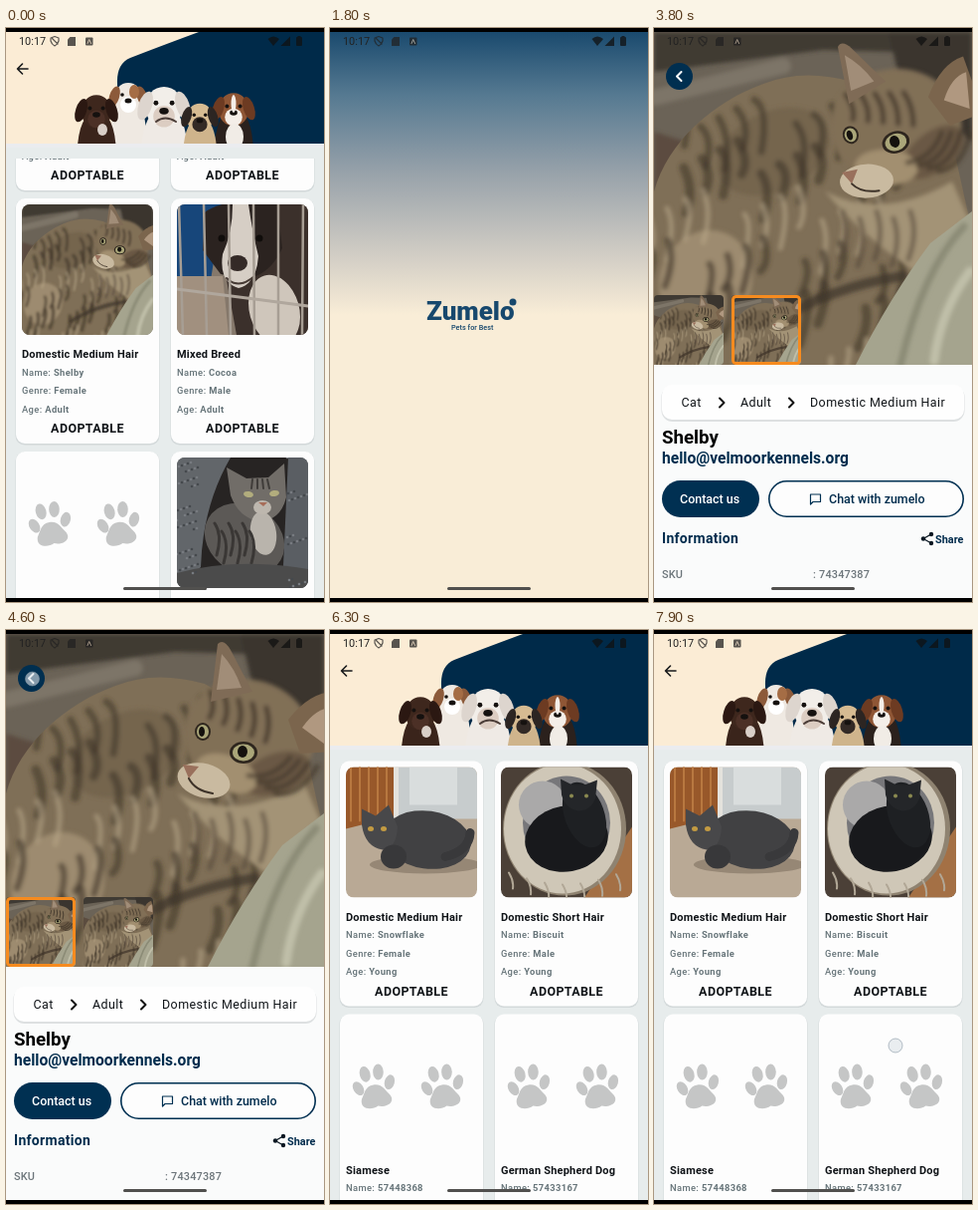
An HTML page that plays this animation: 320x576 px, repeating every 8 s.

```html
<!DOCTYPE html>
<html lang="en">
<head>
<meta charset="utf-8">
<title>Pet adoption app</title>
<style>
  html, body { margin: 0; width: 100%; height: 100%; overflow: hidden; background: #000; }
  svg { display: block; }
  #stage { width: 100%; height: 100%; }
  text { font-family: Roboto, sans-serif; fill: #101418; }
  .breed { font-size: 11px; font-weight: 700; letter-spacing: .2px; }
  .fact { font-size: 9.35px; font-weight: 500; letter-spacing: .38px; fill: #667479; }
  .fact tspan { font-weight: 700; }
  .action { font-size: 12.46px; font-weight: 700; letter-spacing: .4px; text-anchor: middle; }
  .crumb { font-size: 12.46px; letter-spacing: .45px; }
  .name { font-size: 18.7px; font-weight: 700; fill: #000; }
  .mail { font-size: 15.6px; font-weight: 600; fill: #002c4d; }
  .button { font-size: 12.46px; font-weight: 500; fill: #002c4d; }
  .heading { font-size: 14px; font-weight: 700; letter-spacing: .3px; fill: #002c4d; }
  .share { font-size: 10.9px; font-weight: 700; fill: #002c4d; }
  .sku { font-size: 10.9px; font-weight: 500; letter-spacing: .2px; fill: #6c757a; }
  .clock { font-size: 10.9px; fill: #222; }
  .logo { font-size: 26px; font-weight: 900; fill: #17486d; }
  .slogan { font-size: 7.3px; font-weight: 500; fill: #17486d; }
</style>
</head>
<body>
<svg id="stage" viewBox="0 0 320 576"></svg>
<script>
const NAVY = '#003052';
const LOOP = 8000;

const ellipse = (x, y, rx, ry, fill, turn = 0) =>
  `<ellipse cx="${x}" cy="${y}" rx="${rx}" ry="${ry}" fill="${fill}" transform="rotate(${turn} ${x} ${y})"/>`;
const dot = (x, y, r, fill) => ellipse(x, y, r, r, fill);
const rect = (x, y, w, h, fill, r = 0, extra = '') =>
  `<rect x="${x}" y="${y}" width="${w}" height="${h}" rx="${r}" fill="${fill}" ${extra}/>`;
const shape = (d, fill) => `<path d="${d}" fill="${fill}"/>`;
const line = (d, color, width, extra = '') =>
  `<path d="${d}" fill="none" stroke="${color}" stroke-width="${width}" stroke-linecap="round" stroke-linejoin="round" ${extra}/>`;
const text = (kind, x, y, content) => `<text class="${kind}" x="${x}" y="${y}">${content}</text>`;
const group = (id, content) => `<g id="${id}">${content}</g>`;
const soft = content => `<g filter="url(#soft)">${content}</g>`;
const repeat = (count, draw) => Array.from({ length: count }, (_, i) => draw(i)).join('');

// Photos, simplified to soft shapes
const TABBY_BODY = 'M0 160C14 110 60 70 110 52Q150 36 200 50L300 110 320 200 205 334H0Z';
const tabbyPhoto = headMove => {
  const stripes = repeat(70, i => {
    const x = (i * 61) % 270 - 14, y = 48 + (i * 47) % 285;
    return line(`M${x} ${y}q${18 - y / 20} ${8 + i % 5 * 4} ${12 - y / 14} ${34 + i % 4 * 6}`, i % 3 ? '#40362a' : '#b9a88b', 5 + i % 3 * 2, 'opacity=".6"');
  });
  const head = soft(ellipse(244, 104, 66, 58, '#816f56', 18)
    + ellipse(272, 140, 36, 20, '#6a5944', -20) + ellipse(222, 140, 32, 18, '#a28f70', 20)
    + repeat(5, i => line(`M${206 + i * 14} ${58 + i * 4}q5 16 -1 ${26 + i * 2}`, '#40362b', 5, 'opacity=".8"'))
    + repeat(4, i => line(`M${244 + i * 9} ${142 + i * 6}q24 4 42 ${-18 - i * 3}`, '#43382b', 5, 'opacity=".7"')))
    + shape('M206 68L213 10Q219 4 226 16L248 58Z', '#7f6b56') + shape('M212 56L217 20Q230 34 237 54Z', '#a18d78')
    + shape('M284 86Q306 58 330 58L332 118 296 120Z', '#7b654d') + shape('M298 94Q312 74 328 74L320 110Z', '#b09880')
    + ellipse(199, 147, 27, 17, '#c9baa0', 15)
    + ellipse(198, 98, 8, 9, '#2e261e') + ellipse(198, 98, 6, 7, '#aaa679') + ellipse(197, 98, 3, 5, '#15120e')
    + ellipse(239, 119, 14, 11, '#2e261e') + ellipse(239, 119, 11, 8.5, '#aaa679') + ellipse(238, 118, 5, 6, '#15120e')
    + shape('M178 131L194 133 184 145Z', '#99705c') + line('M184 145Q190 157 208 160', '#3d3228', 2);
  return rect(0, 0, 320, 334, '#6b6357') + soft(
      shape('M0 0H320V22L170 18 0 40Z', '#3f3a33') + line('M0 66L130 34', '#7d7568', 16)
      + shape('M236 0H320V110L250 60Z', '#3a352f') + shape('M0 100L38 112 0 185Z', '#5b4c3f'))
    + `<g clip-path="url(#tabbyBody)">${rect(0, 0, 320, 334, '#7f6f57')}`
    + soft(ellipse(52, 250, 46, 52, '#9d8b6f', 25) + ellipse(120, 120, 60, 40, '#75654e', -25) + stripes) + '</g>'
    + soft(shape('M172 160Q230 190 300 150L320 195 262 240Q210 205 172 160Z', '#a39376')
      + repeat(5, i => line(`M${190 + i * 17} ${180 + i % 2 * 7}q8 22 -2 48`, '#54463a', 5, 'opacity=".6"'))
      + line('M120 292Q180 255 250 245', '#3d3228', 10, 'opacity=".7"'))
    + `<g transform="${headMove}">${head}</g>`
    + shape('M320 180L278 212Q238 265 203 334H320Z', '#a5a48e')
    + soft(line('M312 195Q270 240 248 334', '#8b8b76', 7) + line('M318 240Q288 280 282 330', '#c0bfa9', 9));
};

const kennelPhoto = rect(0, 0, 132, 131, '#85786b') + shape('M0 0H46L34 76 0 72Z', '#17467a')
  + shape('M0 72H46L52 131H0Z', '#a1907f') + shape('M84 0H132V131H60L50 76Z', '#3b302b')
  + ellipse(98, 106, 25, 36, '#cfc6bb', -16) + shape('M28 8Q46 -6 100 -4L106 44Q92 74 66 74L44 70 26 46Z', '#2b2320')
  + shape('M56 0H72Q76 28 82 52 80 80 62 84 42 78 46 50 56 28 56 0Z', '#d6cec5')
  + ellipse(61, 59, 10, 8, '#342a27') + dot(45, 34, 3.5, '#100d0b') + dot(83, 34, 3.5, '#100d0b')
  + line('M50 74Q62 86 78 72', '#463a34', 2)
  + repeat(6, i => line(`M${2 + i * 25} 0L${6 + i * 24} 131`, '#a79e94', 2.5)) + line('M0 85L132 102', '#b0a79d', 3);

const boxCatPhoto = rect(0, 0, 132, 131, '#55585b') + shape('M30 0H116L108 114 22 118Z', '#272423')
  + shape('M0 0H54Q26 48 24 110L0 131Z', '#62666a') + ellipse(68, 82, 42, 34, '#5c5956', 30)
  + shape('M54 38L50 10 70 21 92 20 108 6 110 40Q104 64 82 64 62 60 54 38Z', '#716d68')
  + ellipse(87, 76, 13, 22, '#b9b4ac', -8) + ellipse(72, 37, 5, 3, '#b2ad7d', 10) + ellipse(98, 36, 5, 3, '#b2ad7d', -10)
  + ellipse(86, 50, 9, 7, '#bdb7ae') + shape('M82 45H91L87 49Z', '#a76d59')
  + repeat(4, i => line(`M${76 + i * 5} 22l${i - 1} 9`, '#3f3c39', 2))
  + repeat(6, i => line(`M${38 + i * 7} ${66 + i % 2 * 8}q8 12 2 32`, '#3a3735', 3))
  + shape('M112 0H132V131H106Z', '#5a5e63') + shape('M0 116Q60 100 132 112V131H0Z', '#4b4b4b')
  + repeat(90, i => dot(i * 37 % 22 + (i % 3 ? 0 : 111), i * 29 % 131, 1.3, i % 2 ? '#45494d' : '#777b80'));

const carpetCatPhoto = rect(0, 0, 132, 131, '#b9a995') + rect(50, 0, 82, 52, '#c7cccd')
  + rect(64, 0, 48, 38, '#d9dddd') + shape('M0 0H48V50L0 62Z', '#98582a')
  + repeat(5, i => line(`M${5 + i * 9} 0V54`, '#b87840', 2)) + rect(48, 0, 5, 52, '#e4e2dc')
  + ellipse(80, 98, 56, 9, '#968775') + ellipse(82, 73, 44, 29, '#414143', 8)
  + shape('M16 58L16 42 30 49 43 38 52 60Q51 82 37 83 19 80 16 58Z', '#48484a') + ellipse(48, 90, 13, 12, '#38383a')
  + line('M100 90Q124 84 125 66', '#39393b', 9) + ellipse(25, 62, 3, 2.5, '#c39b42') + ellipse(38, 62, 3, 2.5, '#c39b42');

const bedCatPhoto = rect(0, 0, 132, 131, '#4b4037') + shape('M84 131L132 60V131Z', '#a47045')
  + ellipse(64, 62, 62, 67, '#8f8371') + ellipse(62, 62, 59, 65, '#cfc7b7') + ellipse(66, 56, 44, 47, '#77777a')
  + ellipse(42, 38, 24, 24, '#aaa9a9') + ellipse(66, 72, 42, 33, '#18191c', -10) + ellipse(84, 48, 20, 34, '#1e2023', -20)
  + shape('M61 28L60 12 72 18 84 18 97 13 95 32Q90 44 78 44 65 42 61 28Z', '#242629')
  + dot(71, 29, 2, '#8a8950') + dot(86, 29, 2, '#8a8950')
  + repeat(7, i => line(`M${8 + i * 18} ${106 + 12 * Math.sin(i / 2)}q5 8 4 16`, '#b1a796', 2));

const symbol = (id, w, h, content) =>
  `<symbol id="${id}" viewBox="0 0 ${w} ${h}" preserveAspectRatio="xMidYMid slice">${content}</symbol>`;
const clip = (id, content) => `<clipPath id="${id}">${content}</clipPath>`;
const photo = (id, x, y, w, h) =>
  `<g transform="translate(${x} ${y})" clip-path="url(#round${w})"><use href="#${id}" width="${w}" height="${h}"/></g>`;

const paw = (x, y) => `<g transform="translate(${x} ${y}) rotate(-10)" fill="#c5c6c6">`
  + ellipse(-15.5, -1, 5, 7.5, '#c5c6c6', -22) + ellipse(-6.5, -14, 5.3, 8, '#c5c6c6', -5)
  + ellipse(7, -14, 5.3, 8, '#c5c6c6', 8) + ellipse(16.5, -2, 5, 7.5, '#c5c6c6', 25)
  + shape('M0 -2C9 -2 11 6 15 11 19 19 9 23 1 19.500-6 23-18 20-14 10-10 5-9-2 0-2Z', '#c5c6c6') + '</g>';

const pets = {
  unseen: ['Mixed Breed', 'Juniper', 'Male', 'Adult'],
  tabby: ['Domestic Medium Hair', 'Shelby', 'Female', 'Adult', 'tabby'],
  kennel: ['Mixed Breed', 'Cocoa', 'Male', 'Adult', 'kennel'],
  boxCat: ['Domestic Short Hair', 'Pepper', 'Male', 'Adult', 'boxCat'],
  carpetCat: ['Domestic Medium Hair', 'Snowflake', 'Female', 'Young', 'carpetCat'],
  bedCat: ['Domestic Short Hair', 'Biscuit', 'Male', 'Young', 'bedCat'],
  siamese: ['Siamese', '57448368', 'Male', 'Baby'],
  shepherd: ['German Shepherd Dog', '57433167', 'Female', 'Adult'],
};
const card = (key, x, y) => {
  const [breed, name, genre, age, picture] = pets[key];
  const fact = (label, value, top) => text('fact', 6, top, `${label}: <tspan>${value}</tspan>`);
  return `<g transform="translate(${x} ${y})">` + rect(-.5, .5, 145, 247, '#d3d9da', 9) + rect(0, 0, 144, 246, '#fdfdfd', 9)
    + paw(34, 73) + paw(103, 73)
    + (picture ? `<g class="picture">${rect(6, 6, 132, 131, '#fdfdfd')}${photo(picture, 6, 6, 132, 131)}</g>` : '')
    + text('breed', 6, 160, breed) + fact('Name', name, 177.7) + fact('Genre', genre, 196.3) + fact('Age', age, 214.9)
    + text('action', 72, 235, 'ADOPTABLE') + rect(0, 0, 144, 246, '#12303f', 9, `id="press-${key}" opacity="0"`) + '</g>';
};
const rows = (top, keys) => keys.map((key, i) => card(key, i % 2 ? 166 : 10, top + 254 * Math.floor(i / 2))).join('');

const dog = (x, y, size, coat, head, ear, muzzle) => `<g transform="translate(${x} ${y}) scale(${size})">`
  + shape('M-18 46Q-18 14 -10 4H11Q19 16 18 46Z', coat) + ellipse(0, -2, 14, 15, head)
  + ellipse(-14, -3, 5, 11, ear, 18) + ellipse(14, -3, 5, 11, ear, -18)
  + ellipse(0, 5, 8, 8, muzzle) + ellipse(0, 1, 3.5, 2.5, '#15110f') + dot(-6, -5, 1.8, '#15110f') + dot(6, -5, 1.8, '#15110f') + '</g>';
const header = rect(0, 4, 320, 568, '#e7ecec') + rect(0, 4, 320, 112, '#fbecd5')
  + shape('M194 4Q156 18 125 30 111 36 112 56V116H320V4Z', '#002a49') + rect(0, 116, 320, 4, '#ebecef')
  + `<g clip-path="url(#headerArea)">`
  + dog(123, 72, 1, '#efe9e2', '#efe9e2', '#8c5a3a', '#fff') + ellipse(129, 64, 5, 7, '#a56d45')
  + dog(91, 86, 1.1, '#3a241b', '#3e271d', '#2b1812', '#4c3026') + ellipse(97, 102, 5, 6, '#d9cfc8')
  + dog(229, 84, 1.1, '#2b211d', '#8f5635', '#6d3b22', '#f4eee8') + ellipse(229, 76, 2.5, 9, '#f4eee8') + ellipse(230, 109, 9, 13, '#f1ece6')
  + dog(159, 82, 1.35, '#efeae5', '#f2eee9', '#ddd5ce', '#dccdc2') + line('M151 94Q160 87 171 94', '#4b3d38', 2)
  + dog(195, 92, .95, '#cfb48c', '#d6bb92', '#2c2522', '#332a26') + '</g>'
  + line('M22 41H11.5M16.5 36L11.5 41 16.5 46', '#17191b', 1.6);

const statusBar = text('clock', 13, 17, '10:17') + `<g opacity=".75">`
  + line('M45 10L49 8.5 53 10V13Q52 16.500 49 18 46 16.500 45 13ZM46.500 10.500L52 16', '#222', 1.2)
  + shape('M64.500 9H70V18H62V11.500Z', '#222') + rect(80, 9.5, 7.5, 8, '#222', 1) + line('M82 15.500L83.700 11.500 85.500 15.500', '#c8b9a5', 1)
  + shape('M263.500 11Q269 6 275 11L269 18Z', '#111') + shape('M286 8.500V18H276.500Z', '#111')
  + rect(292, 9, 6, 9, '#111', 1) + rect(293.5, 8, 3, 2, '#111') + '</g>';

const splash = rect(0, 4, 320, 568, 'url(#sky)') + text('logo', 97, 293, 'Zumelo') + dot(184, 275, 3.5, '#17486d')
  + text('slogan', 122, 303, 'Pets for Best');

const detail = rect(0, 4, 320, 568, '#fafbfb')
  + `<g transform="translate(0 4)"><use href="#tabby" width="320" height="334"/>`
  + `<use id="secondPhoto" href="#tabbyFront" width="320" height="334"/></g>`
  + photo('tabby', 0, 268, 70, 70) + photo('tabbyFront', 78, 268, 70, 70)
  + rect(1.5, 269.5, 67, 67, 'none', 3, 'id="selection" stroke="#f68b1f" stroke-width="3"')
  + dot(25.5, 48.5, 13.5, '#002f50') + line('M27.5 44L23 48.500 27.500 53', '#fff', 2)
  + rect(7.5, 359, 305, 36, '#dde0e1', 11) + rect(8, 358, 304, 35, '#fefefe', 10)
  + text('crumb', 27.5, 380, 'Cat') + text('crumb', 87, 380, 'Adult') + text('crumb', 157, 380, 'Domestic Medium Hair')
  + line('M66 371.500L70.500 376 66 380.500M136 371.500L140.500 376 136 380.500', '#111', 2)
  + text('name', 8, 417, 'Shelby') + text('mail', 8, 437, 'hello@velmoorkennels.org')
  + rect(8, 454, 98, 37, NAVY, 18.5) + `<text class="button" x="26" y="477" style="fill:#fff">Contact us</text>`
  + rect(115.8, 454.8, 195.4, 35.4, '#fdfdfd', 17.7, `stroke="${NAVY}" stroke-width="1.6"`)
  + line('M157.500 468H167.500V475.500H160L157.500 478Z', NAVY, 1.2) + text('button', 176, 477, 'Chat with zumelo')
  + text('heading', 8, 517, 'Information') + line('M279 508L271 512.500 279 517', '#0a1722', 1.3)
  + dot(279, 508, 2.2, '#0a1722') + dot(271, 512.5, 2.2, '#0a1722') + dot(279, 517, 2.2, '#0a1722')
  + text('share', 283, 516.5, 'Share') + text('sku', 8, 552, 'SKU') + text('sku', 160, 552, ': 74347387');

const stage = document.getElementById('stage');
stage.innerHTML = `<defs>
  <linearGradient id="sky" x1="0" y1="0" x2="0" y2=".5">
    <stop offset="0" stop-color="#1a4a6e"/><stop offset=".22" stop-color="#557991"/>
    <stop offset=".5" stop-color="#98a2aa"/><stop offset=".78" stop-color="#d0ccc4"/><stop offset="1" stop-color="#f9edd7"/>
  </linearGradient>
  <filter id="soft"><feGaussianBlur stdDeviation="2"/></filter>
  ${clip('tabbyBody', shape(TABBY_BODY, '#000'))}
  ${clip('round132', rect(0, 0, 132, 131, '#000', 8))}${clip('round70', rect(0, 0, 70, 70, '#000', 4))}
  ${clip('listArea', rect(0, 131, 320, 441, '#000'))}${clip('headerArea', rect(0, 4, 320, 112, '#000'))}
  ${symbol('tabby', 320, 334, tabbyPhoto(''))}${symbol('tabbyFront', 320, 334, tabbyPhoto('translate(0 -8) rotate(-18 240 105)'))}
  ${symbol('kennel', 132, 131, kennelPhoto)}${symbol('boxCat', 132, 131, boxCatPhoto)}
  ${symbol('carpetCat', 132, 131, carpetCatPhoto)}${symbol('bedCat', 132, 131, bedCatPhoto)}
</defs>`
  + group('firstList', header + `<g clip-path="url(#listArea)">${rows(-83, ['unseen', 'unseen', 'tabby', 'kennel', 'siamese', 'boxCat'])}</g>`)
  + group('splash', splash) + group('detail', detail)
  + group('secondList', header
    + line('M170.8 145.200A14.500 14.500 0 1 0 170.800 164.800', '#0c395a', 3.4, 'id="spinner"')
    + `<g clip-path="url(#listArea)">${group('cards', rows(131.5, ['carpetCat', 'bedCat', 'siamese', 'shepherd']))}</g>`)
  + statusBar + rect(118, 561, 84, 3, '#51504e', 1.5)
  + `<circle id="touch" r="7" fill="#dce3e8" fill-opacity=".6" stroke="#8796a3" stroke-opacity=".6"/>`
  + rect(0, 0, 320, 4, '#000') + rect(0, 572, 320, 4, '#000');

const find = id => document.getElementById(id);
const put = (id, name, value) => find(id).setAttribute(name, value);
const progress = (t, from, to) => Math.min(1, Math.max(0, (t - from) / (to - from)));
const smooth = p => p * p * (3 - 2 * p);
const fade = (id, value) => {
  put(id, 'opacity', value);
  find(id).style.display = value > 0 ? '' : 'none';
};

// Cubic-bezier(.4, 0, .2, 1), solved by bisection
function screenEase(p) {
  let low = 0, high = 1;
  for (let i = 0; i < 16; i++) {
    const u = (low + high) / 2;
    if (1.2 * (1 - u) ** 2 * u + .6 * (1 - u) * u * u + u ** 3 < p) low = u; else high = u;
  }
  return 3 * (1 - low) * low * low + low ** 3;
}
const screenFade = (t, start) => t <= start ? 0 : t >= start + 700 ? 1 : screenEase((t - start) / 700);

const taps = [[300, 430, 84, 290], [3000, 3200, 110, 297], [3850, 4020, 35, 298], [4500, 4700, 26.5, 49]];
const DRAG_START = 6700;
const loadingPictures = find('cards').querySelectorAll('.picture');

function draw(t) {
  const toSplash = screenFade(t, 400), toList = screenFade(t, 4600);
  fade('firstList', t < 1100 ? 1 : 0);
  fade('splash', t < 2000 ? toSplash : 0);
  fade('detail', t >= 2000 && t < 5300 ? 1 : 0);
  fade('secondList', toList);
  put('press-tabby', 'opacity', .1 * progress(t, 300, 450));

  const second = progress(t, 3200, 3400) * (1 - progress(t, 4000, 4200));
  fade('secondPhoto', second);
  put('selection', 'x', t >= 3200 && t < 4000 ? 79.5 : 1.5);

  put('spinner', 'transform', `rotate(${(t - 5100) * .36} 160 155)`);
  fade('spinner', t < 5700 ? 1 : 0);
  fade('cards', t < 5700 ? 0 : 1);
  loadingPictures.forEach(p => p.setAttribute('opacity', progress(t, 5800, 6250)));

  const fingerY = 417 - 54 * smooth(progress(t, 6850, 7080)) * (1 - smooth(progress(t, 7130, 7900)));
  put('cards', 'transform', `translate(0 ${-Math.max(0, 410 - fingerY)})`);
  put('press-shepherd', 'opacity', .11 * progress(t, 6800, 7000) * (1 - progress(t, 7120, 7300)));

  const tap = t >= DRAG_START ? [0, 0, 243, fingerY] : taps.find(([from, to]) => t >= from && t < to);
  fade('touch', tap ? 1 : 0);
  if (tap) put('touch', 'transform', `translate(${tap[2]} ${tap[3]})`);
}

function tick() {
  draw(performance.now() % LOOP);
  requestAnimationFrame(tick);
}
tick();
</script>
</body>
</html>
```
